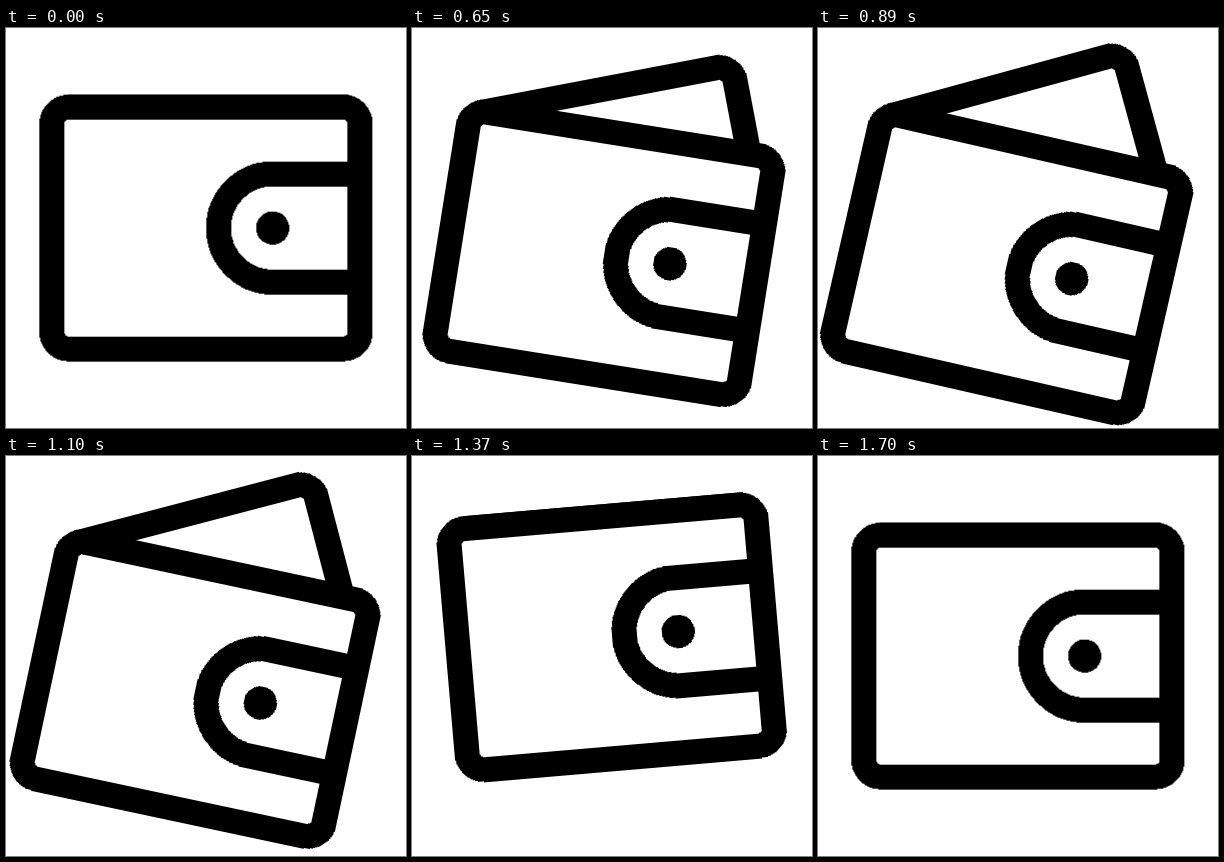
An HTML page without scripts that plays this animation: 400 px wide and 400 px high, repeating every 1.73 s.

```html
<!DOCTYPE html>
<html lang="en">
<head>
<meta charset="utf-8">
<title>Wallet</title>
<style>
  html, body { margin: 0; width: 100%; height: 100%; overflow: hidden; background: #fff; }
  svg { display: block; width: 100%; height: 100%; shape-rendering: crispEdges; }
  .line { fill: none; stroke: #000; stroke-width: 1.5; }
  .body { fill: #fff; }

  .wallet, .lid, .edge { animation: 1.73s linear infinite; }
  .wallet { transform-origin: 12px 12px; animation-name: tilt; }
  .lid { transform-origin: 3.75px 5.75px; animation-name: lift; }
  .edge { animation-name: slide; }

  /* tip forward, swing back past level, settle */
  @keyframes tilt {
    0% { transform: translate(0, 0) rotate(0deg); }
    28.9% {
      transform: translate(0, 0) rotate(0deg);
      animation-timing-function: cubic-bezier(.13, .1, .05, 1);
    }
    60.12% {
      transform: translate(-.7px, 2.22px) rotate(13.25deg);
      animation-timing-function: cubic-bezier(.37, 0, .63, 1);
    }
    80.92% {
      transform: translate(0, -1.18px) rotate(-5.2deg);
      animation-timing-function: cubic-bezier(.37, 0, .63, 1);
    }
    98.27%, 100% { transform: translate(0, 0) rotate(0deg); }
  }

  @keyframes lift {
    0% { transform: rotate(0deg); }
    28.9% {
      transform: rotate(0deg);
      animation-timing-function: cubic-bezier(.13, .1, .05, 1);
    }
    60.12% {
      transform: rotate(-29deg);
      animation-timing-function: cubic-bezier(.37, 0, .63, 1);
    }
    79.19%, 100% { transform: rotate(0deg); }
  }

  /* the lid shortens while it opens */
  @keyframes slide {
    0% { d: path("M3.75 4.75H20.2A1 1 0 0 1 21.2 5.75V13.25"); }
    28.9% {
      d: path("M3.75 4.75H20.2A1 1 0 0 1 21.2 5.75V13.25");
      animation-timing-function: cubic-bezier(.13, .1, .05, 1);
    }
    60.12% {
      d: path("M3.75 4.75H17.07A1 1 0 0 1 18.07 5.75V13.25");
      animation-timing-function: cubic-bezier(.37, 0, .63, 1);
    }
    80.92%, 100% { d: path("M3.75 4.75H20.2A1 1 0 0 1 21.2 5.75V13.25"); }
  }
</style>
</head>
<body>
<svg viewBox="0 0 24 24">
  <g class="wallet">
    <g class="lid">
      <path class="line edge" d="M3.75 4.75H20.2A1 1 0 0 1 21.2 5.75V13.25"/>
    </g>
    <rect class="line body" x="2.75" y="4.75" width="18.5" height="14.5" rx="1"/>
    <path class="line" d="M21 8.75H16a3.25 3.25 0 0 0 0 6.5H21"/>
    <circle cx="16" cy="12" r="1"/>
  </g>
</svg>
</body>
</html>
```
